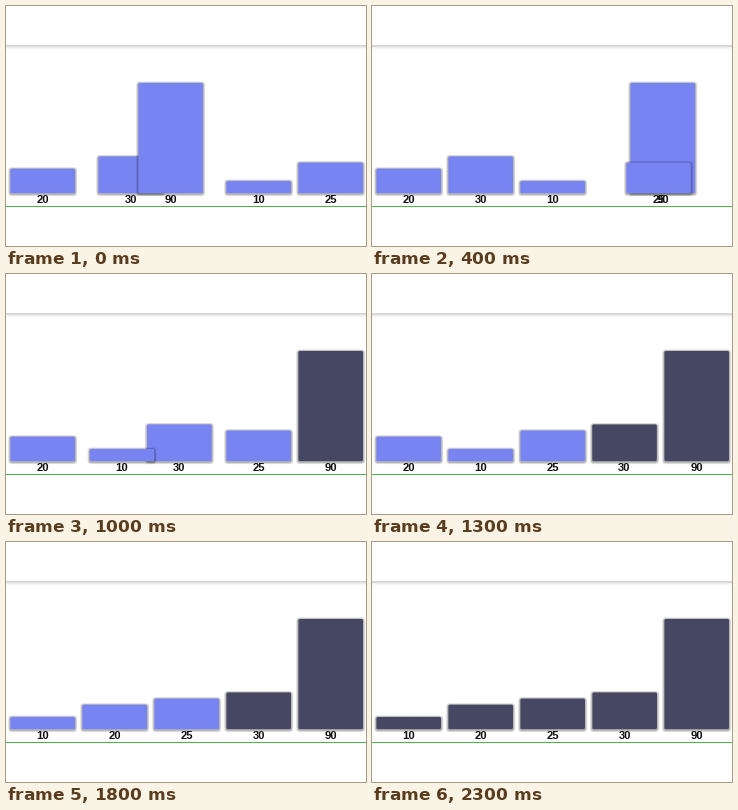
A matplotlib script that plays this animation: 360x240 px, repeating every 2400 ms.

```python
import numpy as np
import matplotlib.pyplot as plt
from matplotlib.animation import FuncAnimation
from matplotlib.patches import FancyBboxPatch, Rectangle

W, H, DPI = 360, 240, 100
FRAMES, INTERVAL = 24, 100

LEFT, SLOT, BAR_W = 4.4, 72, 64.6
FLOOR, SCALE = 187.2, 1.225
LIGHT, DARK = "#7984f3", "#454763"

# Timing in ms: one comparison, pause after a pass, swap duration
STEP, PAUSE, SWAP = 221, 80, 250
START, MARK_DELAY = -340, 12

VALUES = [20, 90, 30, 10, 25]
STACK = [20, 30, 90, 10, 25]  # back to front


def ease(t):
    """CSS 'ease': cubic-bezier(.25, .1, .25, 1)."""
    s = np.linspace(0, 1, 400)
    a, b, c = 3 * s * (1 - s) ** 2, 3 * s**2 * (1 - s), s**3
    return np.interp(t, 0.25 * a + 0.25 * b + c, 0.1 * a + b + c)


def bubble_sort(values):
    """Return moves as (value, time, direction) and the time each value is sorted."""
    row, moves, marks, t = list(values), [], {}, START
    for end in range(len(row) - 1, -1, -1):
        for j in range(end):
            if row[j] > row[j + 1]:
                moves += [(row[j], t, 1), (row[j + 1], t, -1)]
                row[j], row[j + 1] = row[j + 1], row[j]
            t += STEP
        marks[row[end]] = t + MARK_DELAY
        t += PAUSE
    return moves, marks


MOVES, MARKS = bubble_sort(VALUES)

fig = plt.figure(figsize=(W / DPI, H / DPI), dpi=DPI, facecolor="white")
ax = fig.add_axes([0, 0, 1, 1])
ax.set(xlim=(0, W), ylim=(H, 0))
ax.axis("off")

# Header shadow and green baseline
for i, shade in enumerate([0.83, 0.87, 0.93, 0.965, 0.985]):
    ax.add_patch(Rectangle((0, 39 + i), W, 1, color=str(shade), lw=0, aa=False))
ax.add_patch(Rectangle((0, 200), W, 1, color="#45b945", lw=0, aa=False))


class Bar:
    def __init__(self, value, z):
        self.value = value
        h = value * SCALE
        self.parts = []
        for grow in (2.2, 1.5, 0.8):
            self.add(grow, FLOOR - h + 0.7, h, "black", 0.11, z)
        self.face = self.add(0, FLOOR - h, h, LIGHT, 1, z)
        self.label = ax.text(0, 197, str(value), ha="center", va="baseline",
                             family="Liberation Sans", weight="bold",
                             size=11.2 * 72 / DPI, color="#111111", zorder=z)

    def add(self, grow, y, h, color, alpha, z):
        box = FancyBboxPatch((0, y - grow), BAR_W + 2 * grow, h + 2 * grow,
                             boxstyle=f"round,pad=0,rounding_size={1.5 + grow}",
                             fc=color, ec="none", lw=0, alpha=alpha, zorder=z)
        ax.add_patch(box)
        self.parts.append((box, grow))
        return box

    def update(self, t):
        slot = VALUES.index(self.value)
        for value, start, step in MOVES:
            if value == self.value:
                slot += step * ease((t - start) / SWAP)
        x = LEFT + SLOT * slot
        for box, grow in self.parts:
            box.set_x(x - grow)
        self.face.set_facecolor(DARK if t >= MARKS[self.value] else LIGHT)
        self.label.set_x(x + BAR_W / 2)


bars = [Bar(v, 3 + i) for i, v in enumerate(STACK)]


def draw(frame):
    for bar in bars:
        bar.update(frame * INTERVAL)
    return []


anim = FuncAnimation(fig, draw, frames=FRAMES, interval=INTERVAL,
                     repeat=True, repeat_delay=0, blit=False)
plt.show()
```
